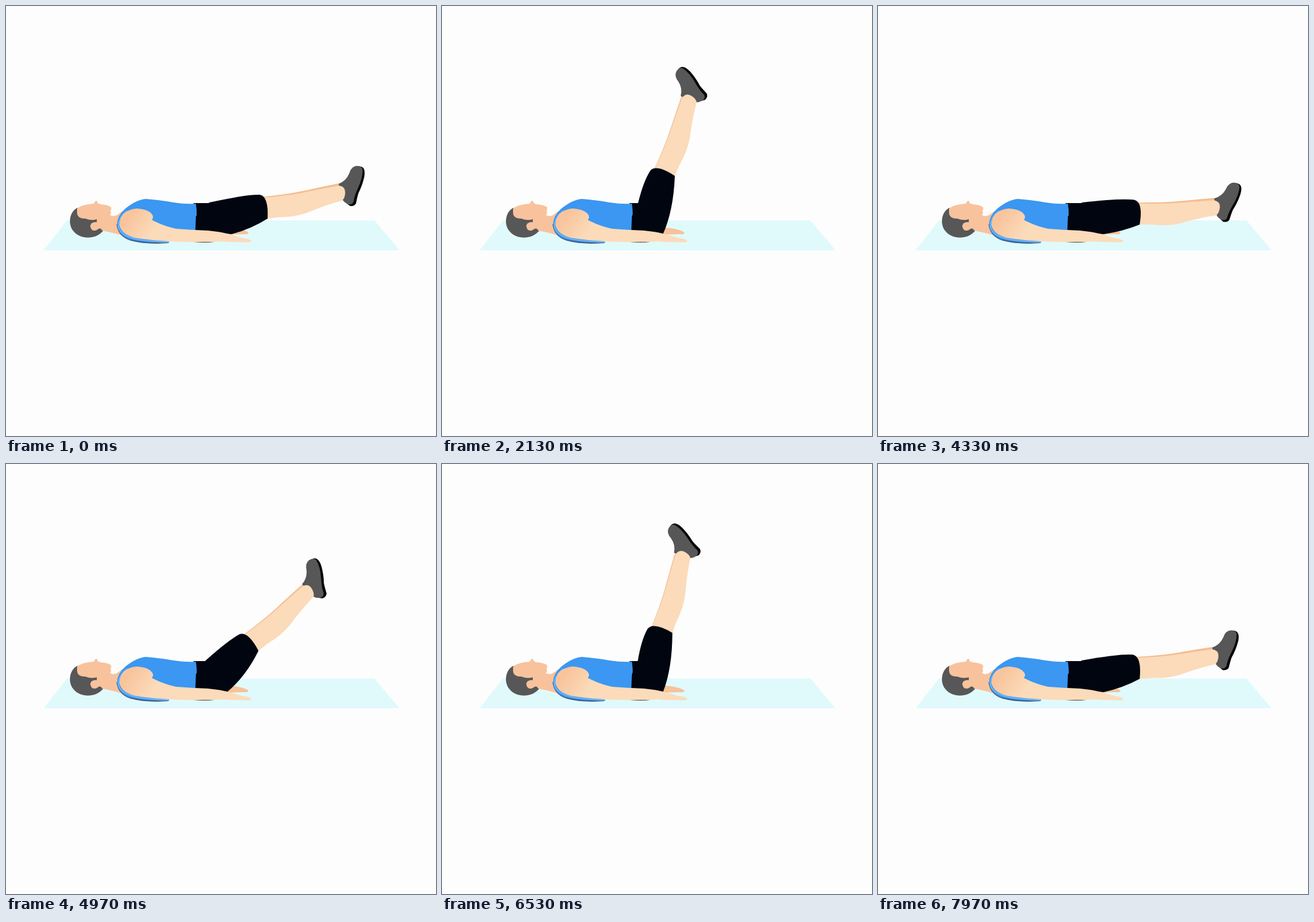
Animation of 720x720 px, one loop 8 s. Source, as an HTML page:

```html
<!DOCTYPE html>
<html lang="en">
<head>
<meta charset="utf-8">
<title>Lying leg raise</title>
<style>
html, body { margin: 0; width: 100%; height: 100%; overflow: hidden; background: #fdfdfd; }
svg { display: block; width: 100vw; height: 100vh; }
</style>
</head>
<body>
<svg viewBox="0 0 720 720">
  <defs>
    <linearGradient id="armSkin" gradientUnits="userSpaceOnUse" x1="208" y1="350" x2="246" y2="378">
      <stop offset="0" stop-color="#f8c49c"/>
      <stop offset="1" stop-color="#fbdbba"/>
    </linearGradient>
    <path id="shin" d="M418 322 Q470 318 500 312 Q535 305 557 301 Q568 302 568 312 Q568 322 563 326
      Q540 332 515 342 Q495 351 472 353 Q455 353 438 356 L418 358Z"/>
  </defs>

  <path fill="#e0fafc" d="M102 359H617L659 409H63Z"/>
  <path fill="#f6c29a" d="M366 371Q382 371 393 374Q405 377 406 380Q405 383 398 382L366 383Z"/>

  <!-- head and neck -->
  <path fill="#575757" d="M119 338C105 346 104 367 113 377C124 391 150 392 163 376L150 345Z"/>
  <path fill="#f8c29c" d="M119 339Q128 332 147 331Q149 326 152 326Q153 331 158 332Q172 333 176 337Q177 340 175 343
    Q177 347 174 350Q178 353 184 351Q188 349 194 344L214 340L200 386Q182 380 161 376Q159 371 155 373
    Q150 378 144 375Q139 369 143 364Q148 361 152 362V357Q143 360 133 356Q119 356 119 346Z"/>

  <!-- torso -->
  <path fill="#000510" d="M314 330H345L336 378L348 395Q334 397 314 395Z"/>
  <path fill="#3f5f86" d="M185 365Q187 386 209 393Q235 400 273 397L250 385Z"/>
  <path fill="#3b97f2" d="M186 368Q185 352 200 339Q219 324 234 323Q258 325 281 329Q300 332 318 331
    Q321 352 318 377L262 384L274 396Q230 397 205 390Q189 383 186 368Z"/>
  <path fill="none" stroke="#6fb7f8" stroke-width="2" d="M203 343Q186 356 189 372Q194 386 222 391Q246 395 272 395"/>

  <g id="farLeg" fill="#f5bd92"><use href="#shin"/></g>
  <g id="leg">
    <g id="foot">
      <path fill="#060608" d="M584 269Q594 267 598 271Q602 275 600 286Q597 300 590 314Q588 321 586 331Q583 336 576 335L567 328Z"/>
      <path fill="#575757" d="M557 298Q570 293 575 280Q578 269 587 268Q595 268 597 273Q598 287 589 306
        Q583 319 582 328Q579 334 573 332Q566 329 564 325Z"/>
    </g>
    <use href="#shin" fill="#fbdbba"/>
  </g>
  <path id="shorts" fill="#000510"/>

  <!-- near arm -->
  <path fill="url(#armSkin)" d="M219 339Q236 340 243 347Q249 353 244 358Q262 368 285 373Q310 375 338 376
    Q360 378 374 382Q385 385 394 388Q410 390 411 394Q408 397 390 395Q374 396 362 394Q340 396 300 395
    Q250 394 215 388Q193 382 190 367Q190 342 219 339Z"/>
</svg>
<script>
const HIP = [352, 362];
const REST = 13.2;
const LOOP = 8000, CYCLE = 4470, START = 470;

// [time in the cycle, leg angle above horizontal]
const POSES = [
  [0, -3], [470, 13.2], [830, 35], [970, 44], [1200, 58.5], [1340, 66], [1800, 82],
  [2240, 82], [2530, 76.2], [2600, 73.2], [2830, 64], [3070, 53.3], [3650, 26],
  [3900, 14.1], [3970, 10.7], [4270, -3], [4470, -3]
];

const byId = id => document.getElementById(id);
const [farLeg, leg, foot, shorts] = ['farLeg', 'leg', 'foot', 'shorts'].map(byId);

const secant = i => POSES[i + 1]
  ? (POSES[i + 1][1] - POSES[i][1]) / (POSES[i + 1][0] - POSES[i][0]) : 0;

function tangent(i) {
  if (i === 0) return 0;
  const before = secant(i - 1), after = secant(i);
  return before * after <= 0 ? 0 : (before + after) / 2;
}

function angleAt(time) {
  let i = 0;
  while (i < POSES.length - 2 && time >= POSES[i + 1][0]) i++;
  const [t0, a0] = POSES[i], [t1, a1] = POSES[i + 1];
  const span = t1 - t0, u = (time - t0) / span, v = 1 - u;
  return a0 * v * v * (1 + 2 * u) + a1 * u * u * (3 - 2 * u)
    + span * u * v * (v * tangent(i) - u * tangent(i + 1));
}

function turned(x, y, degrees) {
  const r = degrees * Math.PI / 180, dx = x - HIP[0], dy = y - HIP[1];
  return [HIP[0] + dx * Math.cos(r) + dy * Math.sin(r),
          HIP[1] - dx * Math.sin(r) + dy * Math.cos(r)];
}

function shortsPath(angle) {
  const turn = angle - REST, lift = Math.sin(angle * Math.PI / 180);
  const front = turned(404, 315, turn);
  const cuffTop = turned(425, 316, turn);
  const cuffBend = turned(440, 319, turn);
  const cuffLow = turned(438, 356, turn);
  const creaseX = 341 - 13 * (angle - 10) / 66;
  const seatX = 370 + 8 * Math.max(0, Math.min(1, (40 - angle) / 27));
  const back = [(cuffLow[0] + seatX) / 2 + 8 * lift, (cuffLow[1] + 382) / 2 + 3 + 7 * lift];
  return `M317 377L318 352L${creaseX} 329Q${front} ${cuffTop}Q${cuffBend} ${cuffLow}`
    + `Q${back} ${seatX} 382Z`;
}

const rotate = (el, degrees, [x, y]) => el.setAttribute('transform', `rotate(${degrees} ${x} ${y})`);

function draw(now) {
  const angle = angleAt((now % LOOP + START) % CYCLE);
  const turn = angle - REST;
  rotate(leg, -turn, HIP);
  rotate(farLeg, -turn - 1.1 + angle * 0.009, HIP);
  rotate(foot, turn * 0.09, [561, 313]);
  shorts.setAttribute('d', shortsPath(angle));
}

const begin = performance.now();
function tick() {
  draw(performance.now() - begin);
  requestAnimationFrame(tick);
}
tick();
</script>
</body>
</html>
```
